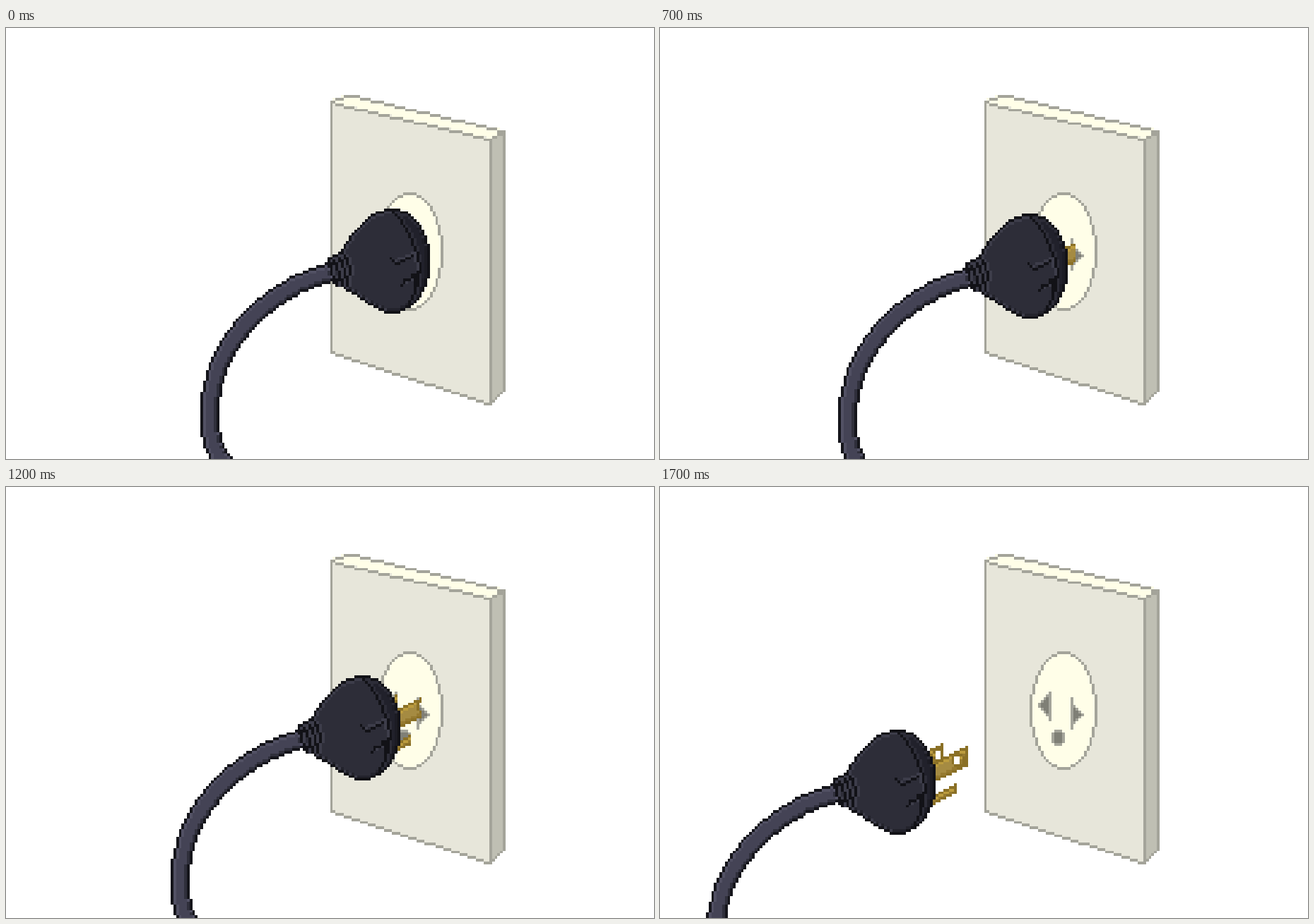
Write an HTML page with a canvas that moves like this. It is 917x611 px and loops after 2 s.

```html
<!DOCTYPE html>
<html lang="en">
<head>
<meta charset="utf-8">
<title>Unplugging</title>
<style>
  html, body { margin: 0; width: 100%; height: 100%; overflow: hidden; background: #fff; }
  canvas { display: block; width: 917px; height: 611px; image-rendering: pixelated; }
</style>
</head>
<body>
<canvas id="stage" width="240" height="160"></canvas>
<script>
const W = 240, H = 160;
const STEP = 100, LOOP = 2000, LAST_STEP = 17, YANK_STEP = 12;
const GREY = '#a4a49a', DARK_GREY = '#7f7f76', CREAM = '#fffee8', INK = '#121217';
const RUBBER = { fill: '#2d2d38', edge: INK, light: '#3d3d4a', shade: '#23232c' };
const RIM = { fill: '#21212b', edge: INK, light: '#2d2d38', shade: '#1c1c24' };
const CABLE = { fill: '#444355', edge: '#15151b', light: '#525164', shade: '#2f2f3b' };
const BRASS = { fill: '#a58b42', edge: '#8a7026', light: '#bc9c3e', shade: '#967a30' };
const SLOT = flat(DARK_GREY, GREY);

const stage = document.getElementById('stage').getContext('2d');

function flat(fill, edge = fill) {
  return { fill, edge, light: fill, shade: fill };
}

function layer(paint) {
  const canvas = document.createElement('canvas');
  canvas.width = W;
  canvas.height = H;
  paint(canvas.getContext('2d'));
  return canvas;
}

function rect(ctx, color, x, y, w = 1, h = 1) {
  ctx.fillStyle = color;
  ctx.fillRect(x, y, w, h);
}

function bezier(a, b, c, d, parts = 30) {
  return Array.from({ length: parts + 1 }, (_, i) => {
    const t = i / parts, u = 1 - t;
    return [0, 1].map(k =>
      u * u * u * a[k] + 3 * u * u * t * b[k] + 3 * u * t * t * c[k] + t * t * t * d[k]);
  });
}

function ellipse(cx, cy, rx, ry) {
  return Array.from({ length: 60 }, (_, i) => {
    const a = i * Math.PI / 30;
    return [cx + rx * Math.cos(a), cy + ry * Math.sin(a)];
  });
}

// Outline of a band of constant width along a centre line
function ribbon(center, radius) {
  const side = sign => center.map(([x, y], i) => {
    const [ax, ay] = center[Math.max(i - 1, 0)];
    const [bx, by] = center[Math.min(i + 1, center.length - 1)];
    const k = sign * radius / Math.hypot(bx - ax, by - ay);
    return [x - (by - ay) * k, y + (bx - ax) * k];
  });
  return [...side(1), ...side(-1).reverse()];
}

function inside(pts, x, y) {
  let hit = false;
  pts.forEach(([x1, y1], i) => {
    const [x2, y2] = pts[(i + 1) % pts.length];
    if ((y1 > y) !== (y2 > y) && x < x1 + (y - y1) * (x2 - x1) / (y2 - y1)) hit = !hit;
  });
  return hit;
}

// Fills whole cells, with an outline, a lit upper left and a shaded lower right
function shape(ctx, pts, tone) {
  const xs = pts.map(p => p[0]), ys = pts.map(p => p[1]);
  const x0 = Math.floor(Math.min(...xs)), x1 = Math.ceil(Math.max(...xs));
  const y0 = Math.floor(Math.min(...ys)), y1 = Math.ceil(Math.max(...ys));
  const mask = new Set();
  const key = (x, y) => y * 1000 + x;
  for (let y = y0; y < y1; y++)
    for (let x = x0; x < x1; x++)
      if (inside(pts, x + 0.5, y + 0.5)) mask.add(key(x, y));
  const has = (x, y) => mask.has(key(x, y));
  const isEdge = (x, y) => !(has(x - 1, y) && has(x + 1, y) && has(x, y - 1) && has(x, y + 1));
  for (let y = y0; y < y1; y++)
    for (let x = x0; x < x1; x++) {
      if (!has(x, y)) continue;
      let color = tone.fill;
      if (isEdge(x, y)) color = tone.edge;
      else if (isEdge(x, y - 1) || isEdge(x - 1, y)) color = tone.light;
      else if (isEdge(x, y + 1) || isEdge(x + 1, y)) color = tone.shade;
      rect(ctx, color, x, y);
    }
}

function line(ctx, color, ...pts) {
  for (let i = 0; i < pts.length - 1; i++) {
    const [x1, y1] = pts[i], [x2, y2] = pts[i + 1];
    const n = Math.max(1, Math.ceil(Math.max(Math.abs(x2 - x1), Math.abs(y2 - y1))));
    for (let j = 0; j <= n; j++)
      rect(ctx, color, Math.round(x1 + (x2 - x1) * j / n), Math.round(y1 + (y2 - y1) * j / n));
  }
}

const outlet = layer(ctx => {
  shape(ctx, [[120, 27], [126, 25], [185, 38], [180, 42], [120, 29]], flat(CREAM));
  shape(ctx, [[179, 41], [185, 38], [185, 134.5], [180, 140]], flat('#bfbfb3'));
  shape(ctx, [[120, 27.5], [123, 28], [180, 41], [180, 140], [120, 121]], flat('#e7e6da'));
  line(ctx, GREY, [120, 27], [122, 26.4], [126, 25], [129, 25.15], [184, 38], [184, 134], [179, 139]);
  line(ctx, GREY, [179, 139.4], [120, 120], [120, 27], [123, 28.15], [179, 41], [184, 38]);
  line(ctx, GREY, [179, 41], [179, 139]);
  shape(ctx, ellipse(149.5, 83, 12.5, 22), flat(CREAM, GREY));

  shape(ctx, [[145, 76], [140, 81], [145, 86]], SLOT);
  rect(ctx, GREY, 144, 76, 1, 11);
  shape(ctx, [[152, 79.5], [157, 84.5], [152, 89.5]], SLOT);
  rect(ctx, GREY, 152, 78, 1, 12);
  shape(ctx, ellipse(147.5, 93, 2.7, 3), SLOT);
});

// A slanted blade ending at (x, y), hidden beyond the wall position of its slot
function prong(limit, x, y, height, hole) {
  const length = 14, drop = length / 2;
  const image = layer(ctx => {
    shape(ctx, [[x, y], [x, y + height], [x - length, y + height + drop], [x - length, y + drop]], BRASS);
    if (!hole) return;
    shape(ctx, ellipse(...hole, 2.5, 2.5), BRASS);
    ctx.clearRect(Math.floor(hole[0]) - 1, Math.floor(hole[1]) - 1, 2, 3);
  });
  return { limit, image };
}

const prongs = [
  prong(145, 160, 72, 6, [158, 76.5]),
  prong(150, 165, 87, 3.5),
  prong(154, 169, 73, 7.5, [165.5, 78.5]),
];

const plug = layer(ctx => {
  const cable = [
    ...bezier([121, 90.5], [97, 96], [75.6, 118], [75.6, 142]),
    ...bezier([75.6, 142], [75.6, 150], [75.2, 157], [84, 165]).slice(1),
  ];
  shape(ctx, ribbon(cable, 3.6), CABLE);
  shape(ctx, [[119, 85], [126, 83], [128, 98], [121, 94.5]], RUBBER);

  const front = [
    ...bezier([143, 67], [153, 67], [157.5, 78], [157.2, 88]),
    ...bezier([157.2, 88], [157, 98], [150, 106], [143, 106]),
  ];
  const crown = bezier([123.5, 83.5], [128.5, 75], [135, 67], [143, 67]);
  const belly = bezier([143, 106], [137, 106], [131, 99.5], [123.5, 96]);
  const seam = bezier([146, 105.5], [159, 93], [149, 73], [142, 67.5]);
  shape(ctx, [...crown, ...front, ...belly], RUBBER);
  shape(ctx, [...front, ...seam], RIM);

  // Rings of the cable sleeve
  for (let i = 0; i < 3; i++) {
    const x = 120 + 2 * i, y = 85 - i;
    const ring = dx => bezier([x + dx, y], [x + dx + 3, y + 3], [x + dx + 3, y + 7], [x + dx + 2, y + 10 + i], 12);
    line(ctx, RUBBER.light, ...ring(1));
    line(ctx, INK, ...ring(0));
  }

  // Grip
  line(ctx, RUBBER.light, [143, 86], [151, 83], [152, 90]);
  line(ctx, INK, [142, 85], [144, 87], [150, 84]);
  line(ctx, INK, [152, 83], [153, 90], [150, 91]);
  line(ctx, RUBBER.light, [147, 94], [150, 93]);
  line(ctx, INK, [146, 95], [147, 93], [151, 92], [151, 96]);
});

// A slow, steady pull that ends in a sudden yank
function offset(step) {
  const yank = Math.max(0, step - YANK_STEP);
  return [-Math.round(0.88 * step + 0.32 * yank ** 3), Math.round(0.29 * step + 0.72 * yank ** 2)];
}

function draw(time) {
  const [dx, dy] = offset(Math.min(Math.floor(time % LOOP / STEP), LAST_STEP));
  rect(stage, '#fff', 0, 0, W, H);
  stage.drawImage(outlet, 0, 0);
  for (const { limit, image } of prongs) {
    const width = Math.min(W, limit - dx);
    stage.drawImage(image, 0, 0, width, H, dx, dy, width, H);
  }
  stage.drawImage(plug, dx, dy);
}

let start;
function tick(now) {
  start ??= now;
  draw(now - start);
  requestAnimationFrame(tick);
}
draw(0);
requestAnimationFrame(tick);
</script>
</body>
</html>
```
